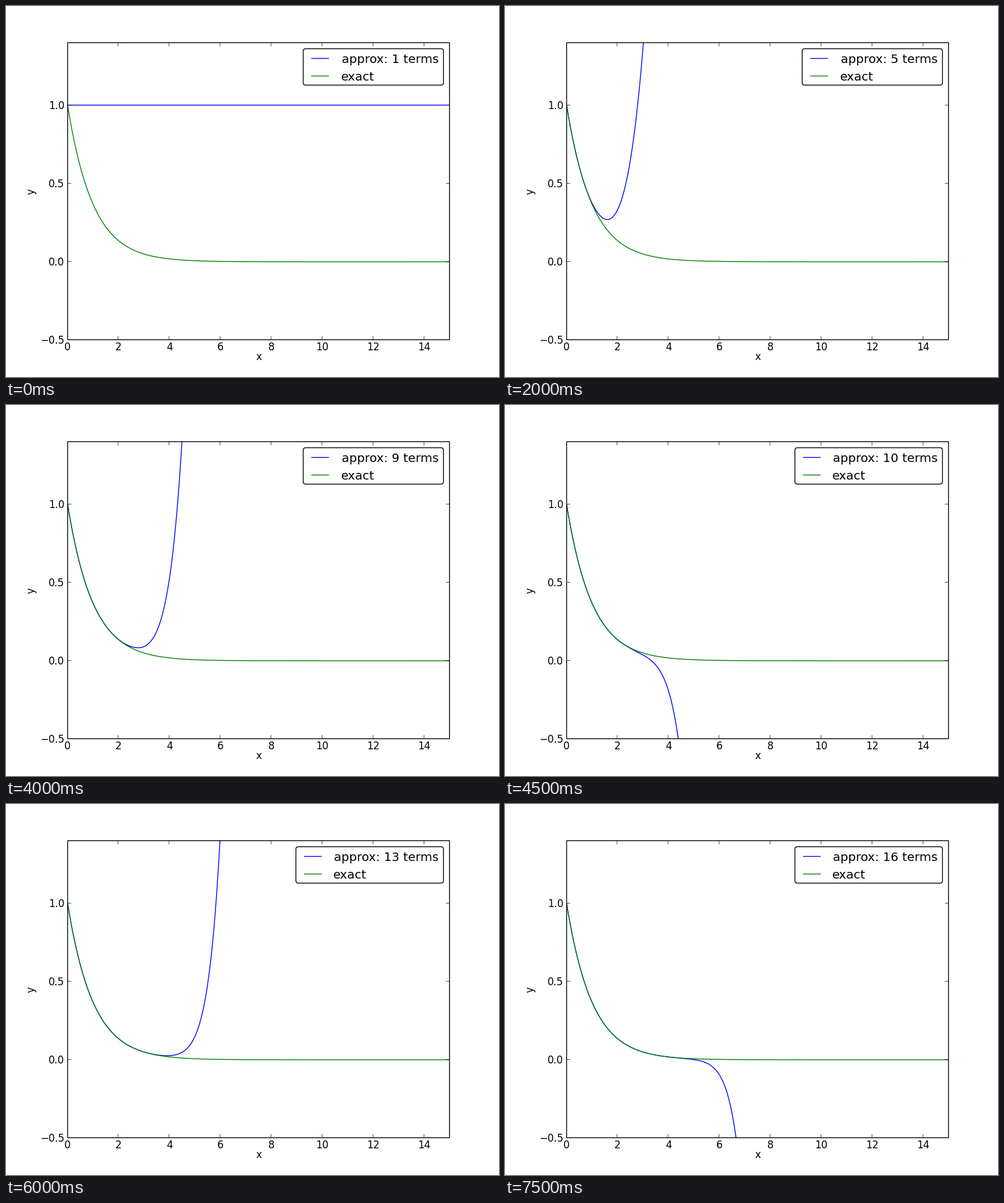
These frames come from a looping animation (812x612 px, 8 s). A matplotlib script:

```python
import numpy as np
import matplotlib.pyplot as plt
from matplotlib.animation import FuncAnimation
from matplotlib.patches import FancyBboxPatch, Rectangle

W, H, DPI = 812, 612, 100
FRAMES, STEP = 16, 500
LEFT, RIGHT, TOP, BOTTOM = 101.5, 730.8, 61.2, 550.8
BLUE, GREEN = "#0000ff", "#008000"

plt.rcParams["font.family"] = "DejaVu Sans"
# The tiny margin keeps float rounding from losing a pixel
fig = plt.figure(figsize=((W + 0.001) / DPI, (H + 0.001) / DPI), dpi=DPI,
                 facecolor="white")
ax = fig.add_axes([0, 0, 1, 1])
ax.set(xlim=(0, W), ylim=(H, 0))
ax.axis("off")


def px(x):
    return LEFT + x * (RIGHT - LEFT) / 15


def py(y):
    return BOTTOM - (y + 0.5) * (BOTTOM - TOP) / 1.9


def crisp(v):
    """Snap to a pixel centre."""
    return np.floor(v + 0.5) - 0.5


def stroke(xs, ys, color, lw=1.0, z=2.0, cap="projecting"):
    line, = ax.plot(xs, ys, color=color, lw=lw, zorder=z,
                    solid_capstyle=cap, snap=False)
    return line


def label(x, y, s, size=12, ha="center", z=3, **kw):
    return ax.text(x, y, s, fontsize=size, ha=ha, va="baseline",
                   color="black", zorder=z, **kw)


# Curves, clipped to the plot area
x = np.linspace(0, 15, 1501)
area = Rectangle((LEFT, TOP), RIGHT - LEFT, BOTTOM - TOP,
                 transform=ax.transData)
approx = stroke(px(x), py(np.ones_like(x)), BLUE)
exact = stroke(px(x), py(np.exp(-x)), GREEN)
for curve in (approx, exact):
    curve.set_clip_path(area)

# Frame, ticks and labels
x0, x1, y0, y1 = (crisp(v) for v in (LEFT, RIGHT, TOP, BOTTOM))
ax.add_patch(Rectangle((x0, y0), x1 - x0, y1 - y0, fill=False, ec="black",
                       lw=1, joinstyle="miter", snap=False, zorder=2.5))


def tick(xs, ys):
    stroke(xs, ys, "black", lw=0.5, z=2.6, cap="butt")


for v in range(0, 15, 2):
    t = crisp(px(v))
    tick([t, t], [y0, y0 + 6])
    tick([t, t], [y1, y1 - 6])
    label(px(v), 568, str(v))

for v in (-0.5, 0.0, 0.5, 1.0):
    t = crisp(py(v))
    tick([x0, x0 + 6], [t, t])
    tick([x1, x1 - 6], [t, t])
    label(96, round(py(v)) + 6, f"{v:.1f}".replace("-", "\u2212"), ha="right")

label(416, 584, "x")
label(46, 306, "y", rotation=90, rotation_mode="anchor")

# Legend
box = FancyBboxPatch((489.5, 70.5), 231, 60,
                     boxstyle="round,pad=0,rounding_size=4",
                     fc="white", ec="black", lw=1, snap=False, zorder=5)
ax.add_patch(box)
keys = [stroke([0, 1], [row, row], c, z=6)
        for row, c in ((86.5, BLUE), (115.5, GREEN))]
name_approx = label(553, 94, "", 14.4, "left", 6)
name_exact = label(552, 123, "exact", 14.4, "left", 6)


def taylor(n):
    term = np.ones_like(x)
    total = term.copy()
    for k in range(1, n):
        term = -term * x / k
        total += term
    return total


def update(i):
    n = i + 1
    ys = py(taylor(n))
    approx.set_ydata(crisp(ys) if n == 1 else ys)  # flat line sits on a pixel row

    wide = n > 9
    shift = 12 if wide else 0
    box.set_x(489.5 - shift)
    box.set_width(231 + shift)
    for key in keys:
        key.set_xdata([503.5 - shift, 531.2 - shift])
    name_approx.set_text(f"approx: {n} terms")
    name_approx.set_x(540 if wide else 553)
    name_exact.set_x(539 if wide else 552)
    return approx, box, *keys, name_approx, name_exact


anim = FuncAnimation(fig, update, frames=FRAMES, interval=STEP,
                     init_func=lambda: update(0), repeat=True, repeat_delay=0)
plt.show()
```
